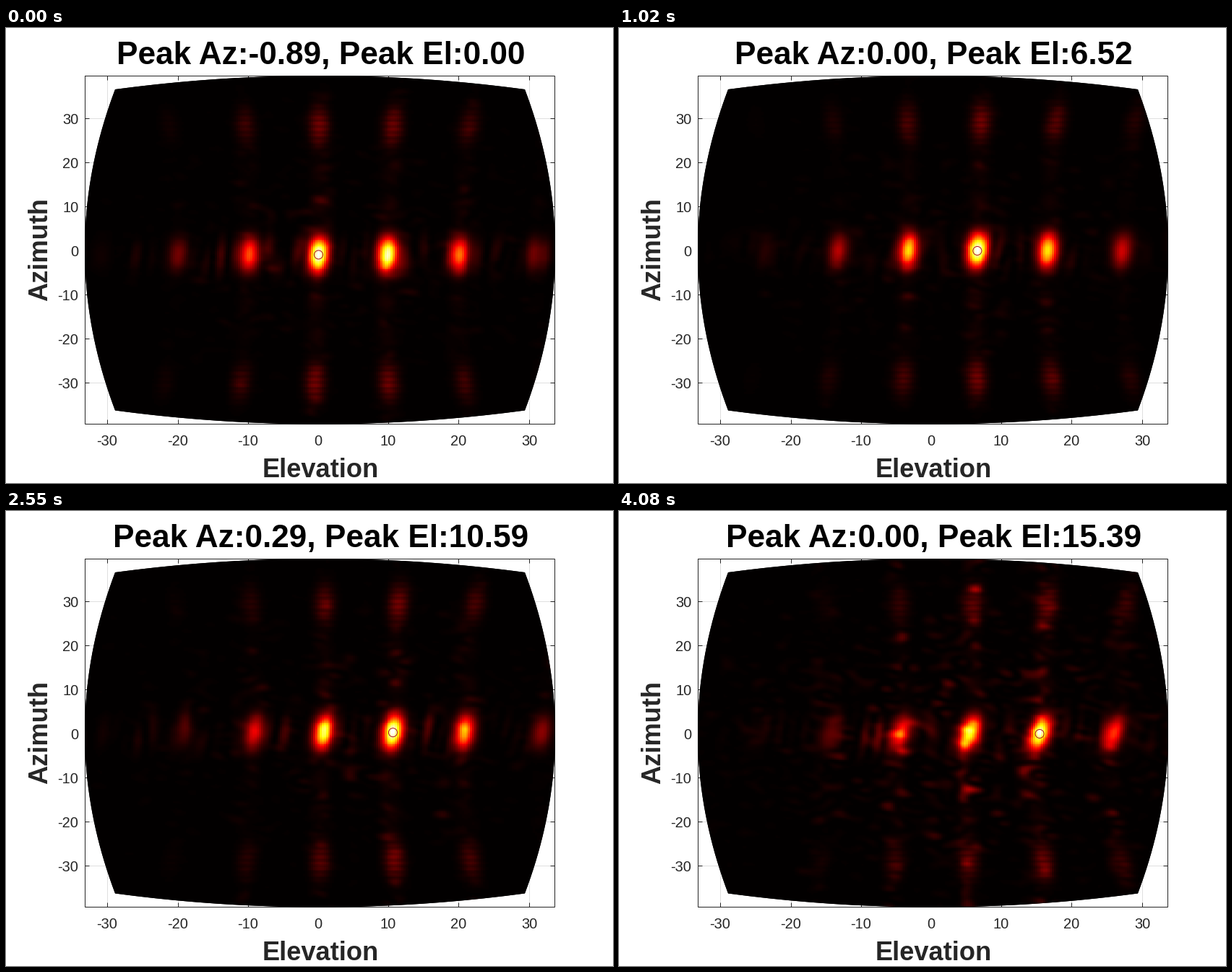
Animation, 840 px wide and 630 px high, one loop 4250 ms. Source, as a matplotlib script:

```python
import numpy as np
import matplotlib.pyplot as plt
from matplotlib.animation import FuncAnimation
from matplotlib.colors import LinearSegmentedColormap
from matplotlib.patches import Circle, PathPatch
from matplotlib.path import Path

W, H, DPI = 840, 630, 100
FRAMES, INTERVAL = 25, 170
X0, Y0, SX, SY = 432.5, 308.5, 9.72, 6.1      # pixel of 0 deg, pixels per deg
LEFT, RIGHT, TOP, BOTTOM = 109.5, 759.5, 66.5, 548.5
GREY, PALE = "#262626", "#dfdfdf"
FONT = "Liberation Sans"
STEP = 0.0051931                              # tangent of one grid cell
SPACING = 0.171                               # lobe distance in sine space

CELL_W, CELL_H, NX, NY = 2.89, 1.82, 227, 269
gx = (np.arange(NX) - NX // 2) * CELL_W / SX
gy = -(np.arange(NY) - NY // 2) * CELL_H / SY
GX, GY = np.meshgrid(gx, gy)

rng = np.random.default_rng(4)


def make_waves(count, kx, ky):
    return [(rng.normal(0, kx), rng.normal(0, ky),
             rng.uniform(0, 2 * np.pi), rng.normal(0, .35))
            for _ in range(count)]


BARS = make_waves(14, 1.0, .2)
RIPPLES = make_waves(18, .9, .8)


def speckle(waves, shift, t):
    field = sum(np.cos(a * (GX - shift) + b * GY + p + w * t)
                for a, b, p, w in waves)
    return field ** 2 * 2 / len(waves)


def bell(d, width, power=2):
    return np.exp(-.5 * np.abs(d / width) ** power)


def peak(i):
    """Peak elevation and azimuth in degrees, snapped to the grid."""
    el = np.round(np.interp(i, [0, 4, 6, 10, 15, 19, 24],
                            [0, 19, 22, 27, 36, 41, 53]))
    az = np.round(np.interp(i, [0, 4, 13, 18, 20, 24], [-3, 0, 0, 2, 2, 0]))
    return np.degrees(np.arctan(STEP * el)), np.degrees(np.arctan(STEP * az))


def lobes(el):
    """Centre and strength of every grating lobe beside the peak."""
    for n in range(-4, 4):
        c = np.degrees(np.arcsin(np.sin(np.radians(el)) + SPACING * n))
        yield c, bell(c - 5.5 - .35 * el, 13) * (1 if n else 1.1)


def heat(i):
    el, az = peak(i)
    late = i / (FRAMES - 1)
    tilt = .03 + .13 * late ** 2
    haze = .005 + .013 * late ** 4
    ripples = speckle(RIPPLES, el, i)
    dy = GY - az

    # vertical profile: main row, two outer rows and faint ones between
    stripes = 1 + .16 * np.cos(2 * np.pi * dy / 1.35)
    outer = bell(np.abs(dy) - 29, 3.0)
    inner = bell(np.abs(dy) - 11, 1.7) + .7 * bell(np.abs(dy) - 18.3, 2)
    profile = (bell(dy, 2.7, 2.2) + .15 * outer * stripes + .035 * inner
               + haze * ripples)

    # outer rows spread a little and lean to one side
    r = dy / 29
    lean = .3 * r - .2 * np.abs(r) + tilt * dy * bell(dy, 8)
    columns = sum(amp * bell(GX - c * (1 + .063 * r * r) - lean, .96)
                  for c, amp in lobes(el))

    wide = bell(GX - 5, 19)
    total = (columns * profile
             + .022 * wide * bell(dy, 2.9) * speckle(BARS, el, i)
             + haze * wide * bell(GY, 17) * ripples)
    return np.clip(total / total.max(), 0, 1)


def field_outline():
    """Barrel-shaped field of view made of four parabolas."""
    s = np.linspace(-1, 1, 41)
    cx, cy = (151 + 718) / 2, (85 + 529.5) / 2
    hx, hy = (718 - 151) / 2, (529.5 - 85) / 2
    bulge_x, bulge_y = 42 * (1 - s * s), 19 * (1 - s * s)
    top = np.c_[cx + hx * s, cy - hy - bulge_y]
    right = np.c_[cx + hx + bulge_x, cy + hy * s]
    bottom = np.c_[cx - hx * s, cy + hy + bulge_y]
    left = np.c_[cx - hx - bulge_x, cy - hy * s]
    return Path(np.vstack([top, right, bottom, left]))


HOT = LinearSegmentedColormap.from_list("heat", [
    (0, (.01, 0, 0)), (.375, (1, 0, 0)), (.75, (1, 1, 0)), (1, (1, 1, 1))], 256)

fig = plt.figure(figsize=(W / DPI, H / DPI), dpi=DPI, facecolor="white")
ax = fig.add_axes([0, 0, 1, 1])
ax.axis("off")


def line(xs, ys, color=GREY, z=1):
    ax.plot(xs, ys, color=color, lw=.72, zorder=z, snap=False,
            solid_capstyle="butt", solid_joinstyle="miter")


def text(x, y, s, px, **kw):
    kw = {"ha": "center", "va": "baseline", "color": GREY, **kw}
    return ax.text(x, y, s, fontsize=px * 72 / DPI, family=FONT, **kw)


for deg in range(-30, 31, 10):
    x, y = np.floor(X0 + deg * SX) + .5, np.floor(Y0 - deg * SY) + .5
    line([x, x], [TOP, BOTTOM], PALE, 0)
    line([LEFT, RIGHT], [y, y], PALE, 0)
    for side, d in ((TOP, 6), (BOTTOM, -6)):
        line([x, x], [side, side + d])
    for side, d in ((LEFT, 6), (RIGHT, -6)):
        line([side, side + d], [y, y])
    text(x - .5, 578, str(deg), 20)
    text(100.5, y + 7.5, str(deg), 20, ha="right")
line([LEFT, RIGHT, RIGHT, LEFT, LEFT], [TOP, TOP, BOTTOM, BOTTOM, TOP])

outline = field_outline()
ax.add_patch(PathPatch(outline, fc=HOT(0), ec="none", zorder=2))
half_w, half_h = NX * CELL_W / 2, NY * CELL_H / 2
image = ax.imshow(heat(0), cmap=HOT, vmin=0, vmax=1, interpolation="nearest",
                  extent=(X0 - half_w, X0 + half_w, Y0 + half_h, Y0 - half_h),
                  aspect="auto", zorder=3)
image.set_clip_path(outline, ax.transData)
marker = ax.add_patch(Circle((X0, Y0), 6, fill=False, ec="#b01020",
                             lw=.72, zorder=4))

title = text(435.5, 50, "", 44.2, weight="bold", color="black")
text(435.5, 622, "Elevation", 36.2, weight="bold")
text(57.5, 307, "Azimuth", 36.2, weight="bold", rotation=90,
     rotation_mode="anchor")
ax.set_xlim(0, W)
ax.set_ylim(H, 0)


def update(i):
    el, az = peak(i)
    shown_az = np.trunc(az * 100) / 100 + 0.0
    image.set_data(heat(i))
    marker.center = (X0 + el * SX, Y0 - az * SY)
    title.set_text(f"Peak Az:{shown_az:.2f}, Peak El:{el:.2f}")
    return image, marker, title


anim = FuncAnimation(fig, update, frames=FRAMES, interval=INTERVAL,
                     repeat=True, repeat_delay=0, blit=False)
plt.show()
```
